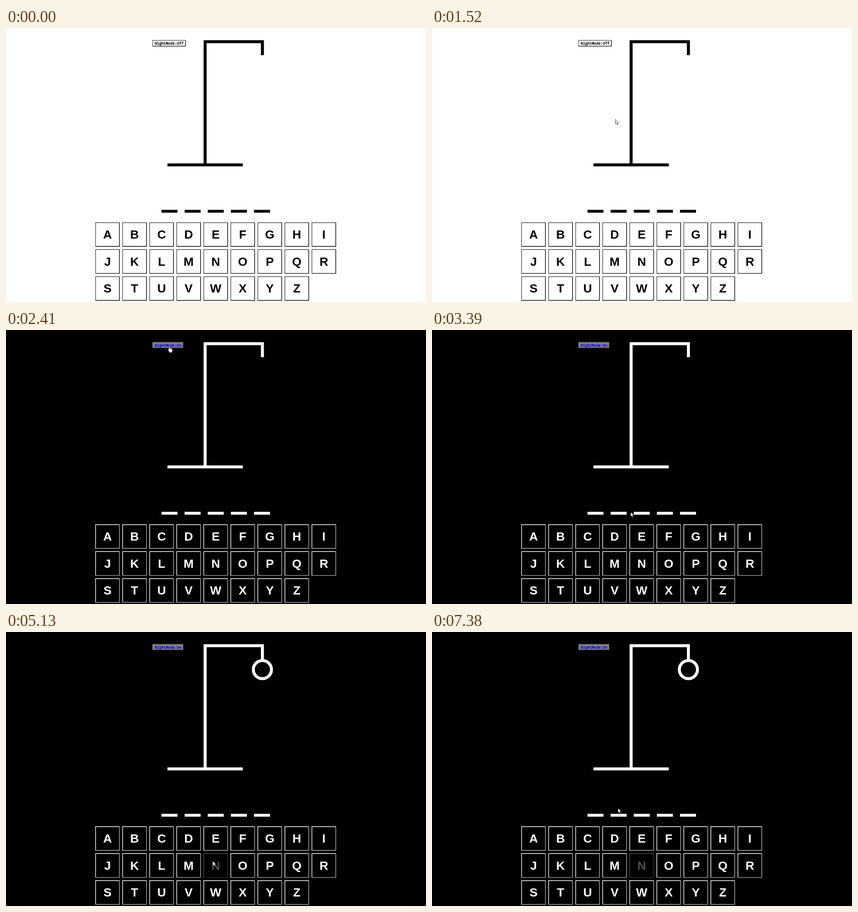
These frames come from a looping animation (926 px wide and 605 px high, 8000 ms). An HTML page:

```html
<!DOCTYPE html>
<html lang="en">
<head>
<meta charset="utf-8">
<title>Hangman</title>
<style>
  html, body { margin: 0; width: 100%; height: 100%; overflow: hidden; }
  svg { display: block; width: 926px; height: 605px; }
  .key text { font: bold 26.6px "Liberation Sans", Arial, sans-serif; text-anchor: middle; }
  #label { font: bold 8.13px "Noto Sans Mono", monospace; }
</style>
</head>
<body>
<svg id="stage" viewBox="0 0 926 605">
  <rect id="page" width="926" height="605"/>
  <g id="toggle"><text id="label" x="328" y="36.8"></text></g>
  <g id="ink" fill="none" stroke-width="6.6">
    <path d="M356 302.3H522M439 300V30.2H565.3V60"/>
    <path id="blanks" stroke-width="6.2"/>
    <circle id="head" cx="565.3" cy="83" r="20"/>
  </g>
  <g id="keys"></g>
  <circle id="click" r="6.8" fill="#ff0" opacity=".62"/>
  <g id="cursor" fill="#fff" stroke="#000" stroke-linejoin="round">
    <path id="arrow" stroke-width=".7" d="M0 0V10.3L2.4 8L4.2 12L5.8 11.3L4 7.4H7.3Z"/>
    <path id="hand" stroke-width=".9" d="M-1.3 1.2Q0 -1 1.3 1.2V5.2Q2.6 4.2 3.5 5.6Q4.8 4.9 5.4 6.2Q7 5.8 7.1 7.4V10Q7.1 11.6 6 13V14.5H.2V13.2L-3.7 8.6Q-4.4 7 -3 7L-1.3 8.4Z"/>
  </g>
</svg>
<script>
const LOOP = 8000, SIZE = 54, PITCH = 59.62;
const NIGHT = 2410, GUESS = 4660;
const CLICKS = [[2330, 2410], [4590, 4660]];

const $ = id => document.getElementById(id);
const set = (el, attrs) => {
  for (const k in attrs) el.setAttribute(k, attrs[k]);
  return el;
};
const add = (parent, tag, attrs = {}) =>
  parent.appendChild(set(document.createElementNS("http://www.w3.org/2000/svg", tag), attrs));
const show = (el, on) => set(el, { visibility: on ? "visible" : "hidden" });

const linear = u => u;
const easeOut = u => u * (2 - u);
const easeInOut = u => u * u * (3 - 2 * u);

// first step, last step, step count, destination, easing
const START = [901, 617];
const MOVES = [
  [590, 990, 7, 628, 460, linear],
  [1060, 1390, 6, 424, 275, linear],
  [1450, 2190, 12, 360, 35.5, easeOut],
  [2600, 3390, 13, 438, 402, easeInOut],
  [4060, 4460, 7, 460, 519.5, easeInOut],
  [4590, 4600, 1, 459, 513, linear],
  [5070, 5470, 7, 402, 389, easeInOut],
  [7050, 7380, 5, 410, 389, linear]
];

function pointer(t) {
  let [x, y] = START;
  for (const [t0, t1, n, tx, ty, ease] of MOVES) {
    if (t < t0) break;
    const step = Math.floor((t - t0) / ((t1 - t0) / (n - 1)) + 0.01) + 1;
    const u = ease(Math.min(1, step / n));
    x += (tx - x) * u;
    y += (ty - y) * u;
  }
  return { x, y };
}

const inside = (p, b) => p.x >= b.x && p.x <= b.x + b.w && p.y >= b.y && p.y <= b.y + b.h;

// Box with an outset border: one shade for top and left, one for bottom and right
function bevel(parent) {
  const back = add(parent, "rect"), lit = add(parent, "path"), dark = add(parent, "path");
  return (b, fill, litColor, darkColor) => {
    const e = b.edge, r = b.x + b.w, d = b.y + b.h;
    set(back, { x: b.x, y: b.y, width: b.w, height: b.h, fill });
    set(lit, { fill: litColor,
      d: `M${b.x} ${d}V${b.y}H${r}l${-e} ${e}H${b.x + e}V${d - e}Z` });
    set(dark, { fill: darkColor,
      d: `M${b.x} ${d}H${r}V${b.y}l${-e} ${e}V${d - e}H${b.x + e}Z` });
  };
}

const keys = [..."ABCDEFGHIJKLMNOPQRSTUVWXYZ"].map((letter, i) => {
  const box = {
    x: 196.8 + (i % 9) * PITCH, y: 429 + Math.floor(i / 9) * PITCH,
    w: SIZE, h: SIZE, edge: 1.4
  };
  const group = add($("keys"), "g", { class: "key" });
  const paint = bevel(group);
  const text = add(group, "text", { x: box.x + SIZE / 2, y: box.y + 36 });
  text.textContent = letter;
  return { letter, box, group, paint, text };
});

const paintToggle = bevel($("toggle"));
$("toggle").append($("label"));

set($("blanks"), {
  d: [0, 1, 2, 3, 4].map(i => `M${342.8 + i * 51} 404.6h35.3`).join("")
});

function render(t) {
  const night = t >= NIGHT, guessed = t >= GUESS;
  const paper = night ? "#000" : "#fff", ink = night ? "#fff" : "#000";
  const p = pointer(t);

  set($("page"), { fill: paper });
  set($("ink"), { stroke: ink });
  show($("head"), guessed);

  const toggle = { x: 322.8, y: 26.7, w: night ? 68.2 : 73.6, h: night ? 13 : 14, edge: 1.3 };
  if (night) paintToggle(toggle, "#808080", "#707070", "#545454");
  else paintToggle(toggle, "#fff", "#4c4c4c", "#000");
  $("label").textContent = "NightMode:" + (night ? "On" : "Off");
  set($("label"), { fill: night ? "#00f" : "#000" });

  let over = inside(p, toggle);
  for (const key of keys) {
    const off = guessed && key.letter === "N";
    const hover = !off && t >= MOVES[0][0] && inside(p, key.box);
    over = over || hover;
    key.paint(key.box, hover ? "#7340ff" : paper,
      night ? "#fff" : "#4c4c4c", night ? "#b2b2b2" : "#000");
    set(key.text, { fill: ink });
    set(key.group, { opacity: off ? 0.3 : 1 });
  }

  set($("cursor"), { transform: `translate(${p.x} ${p.y})` });
  show($("arrow"), !over);
  show($("hand"), over);
  set($("click"), { cx: p.x + 0.5, cy: p.y + 1.5 });
  show($("click"), CLICKS.some(([a, b]) => t >= a && t < b));
}

const began = performance.now();
function frame() {
  render((performance.now() - began) % LOOP);
  requestAnimationFrame(frame);
}
frame();
</script>
</body>
</html>
```
